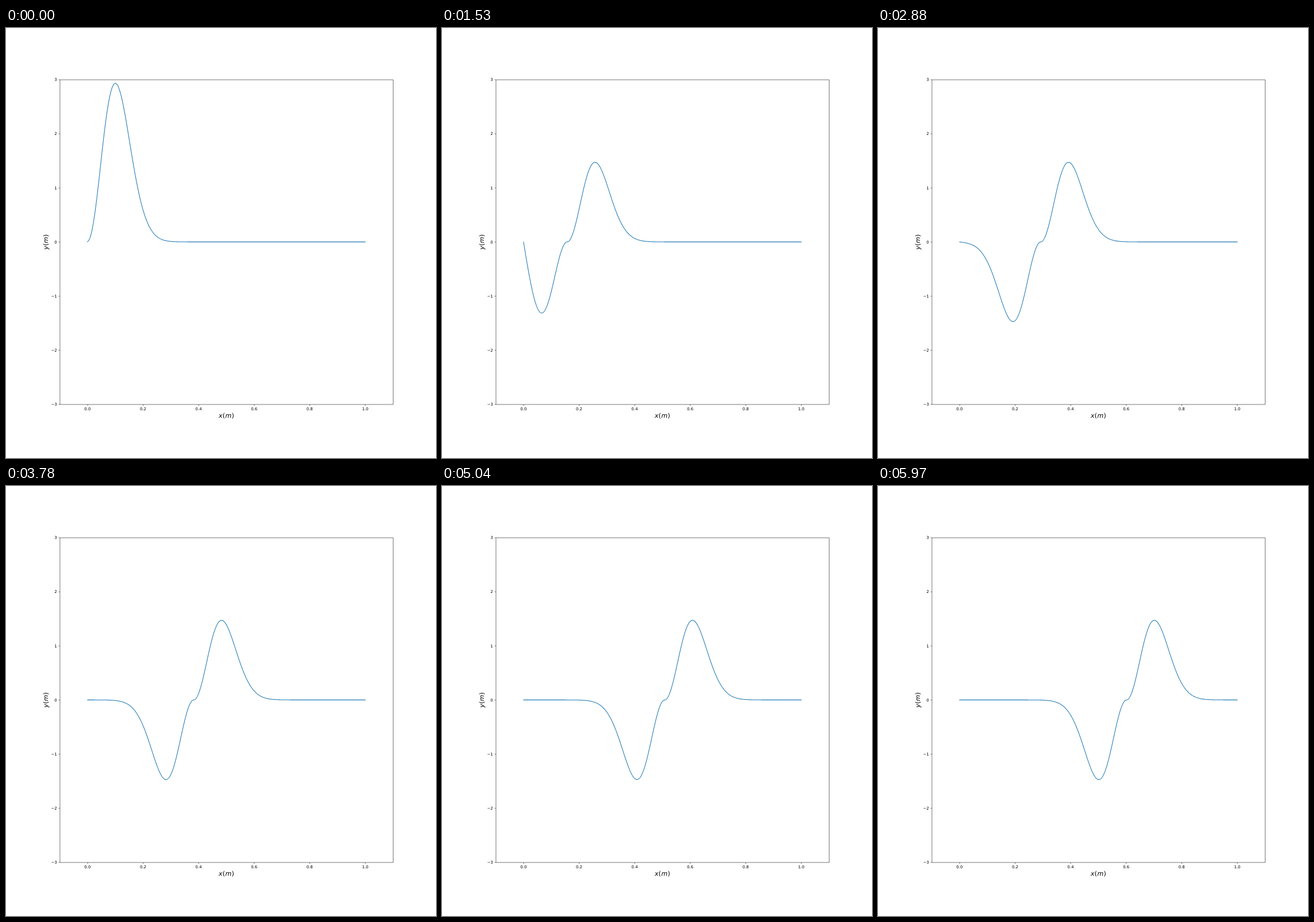
These frames come from a looping animation (748 px wide and 748 px high, 6000 ms). An HTML page:

```html
<!DOCTYPE html>
<html lang="en">
<head>
<meta charset="utf-8">
<title>Wave on a string</title>
<style>
  html, body { margin: 0; width: 100%; height: 100%; overflow: hidden; background: #fff; }
  svg { display: block; width: 748px; height: 748px; }
  text { font: 6.93px "DejaVu Sans", sans-serif; fill: #000; text-rendering: geometricPrecision; }
  .label { font-size: 11.1px; letter-spacing: .2px; text-anchor: middle; }
  .label tspan { font-style: italic; }
  .x { text-anchor: middle; }
  .y { text-anchor: end; }
  #axes { fill: none; stroke: #000; stroke-width: .55; }
  #wave { fill: none; stroke: #1f77b4; stroke-width: 1.04; stroke-linejoin: round; stroke-linecap: square; }
</style>
</head>
<body>
<svg viewBox="0 0 748 748">
  <path id="wave"/>
  <path id="axes"/>
  <g id="ticks"></g>
  <text class="label" x="383.5" y="678"><tspan>x</tspan>(<tspan>m</tspan>)</text>
  <text class="label" transform="translate(72.9 372.2) rotate(-90)"><tspan>y</tspan>(<tspan>m</tspan>)</text>
</svg>
<script>
const LEFT = 93.9, RIGHT = 673.5, TOP = 90.1, BOTTOM = 654.9;
const LOOP = 6000, STEP = 30, POINTS = 1000;
const $ = id => document.getElementById(id);
const px = x => 141.81 + 483.08 * x;
const py = y => 372.13 - 94.12 * y;

function addText(cls, x, y, str) {
  const el = document.createElementNS("http://www.w3.org/2000/svg", "text");
  el.setAttribute("class", cls);
  el.setAttribute("x", x);
  el.setAttribute("y", y);
  el.textContent = str;
  $("ticks").append(el);
}

function drawAxes() {
  let d = `M${LEFT} ${TOP}H${RIGHT}V${BOTTOM}H${LEFT}Z`;
  for (let i = 0; i <= 5; i++) {
    const x = px(i / 5);
    d += `M${x + 0.2} ${BOTTOM}v2.4`;
    addText("x", x, 664.7, (i / 5).toFixed(1));
  }
  for (let v = -3; v <= 3; v++) {
    const y = py(v);
    d += `M${LEFT} ${y + 0.2}h-2.4`;
    addText("y", 88.6, y + 2.6, String(v).replace("-", "\u2212"));
  }
  $("axes").setAttribute("d", d);
}

// Odd pulse: the fixed end at x = 0 reflects it upside down
const pulse = x => 800 * x * Math.abs(x) * Math.exp(-100 * x * x);

function drawWave(shift) {
  let d = "";
  for (let i = 0; i <= POINTS; i++) {
    const x = i / POINTS;
    const y = (pulse(x - shift) + pulse(x + shift)) / 2;
    d += (i ? "L" : "M") + px(x).toFixed(2) + " " + py(y).toFixed(2);
  }
  $("wave").setAttribute("d", d);
}

let last = -1;
function tick() {
  const n = Math.floor((performance.now() % LOOP) / STEP);
  if (n !== last) drawWave(0.0045 + 0.003 * n);
  last = n;
  requestAnimationFrame(tick);
}

drawAxes();
tick();
</script>
</body>
</html>
```
